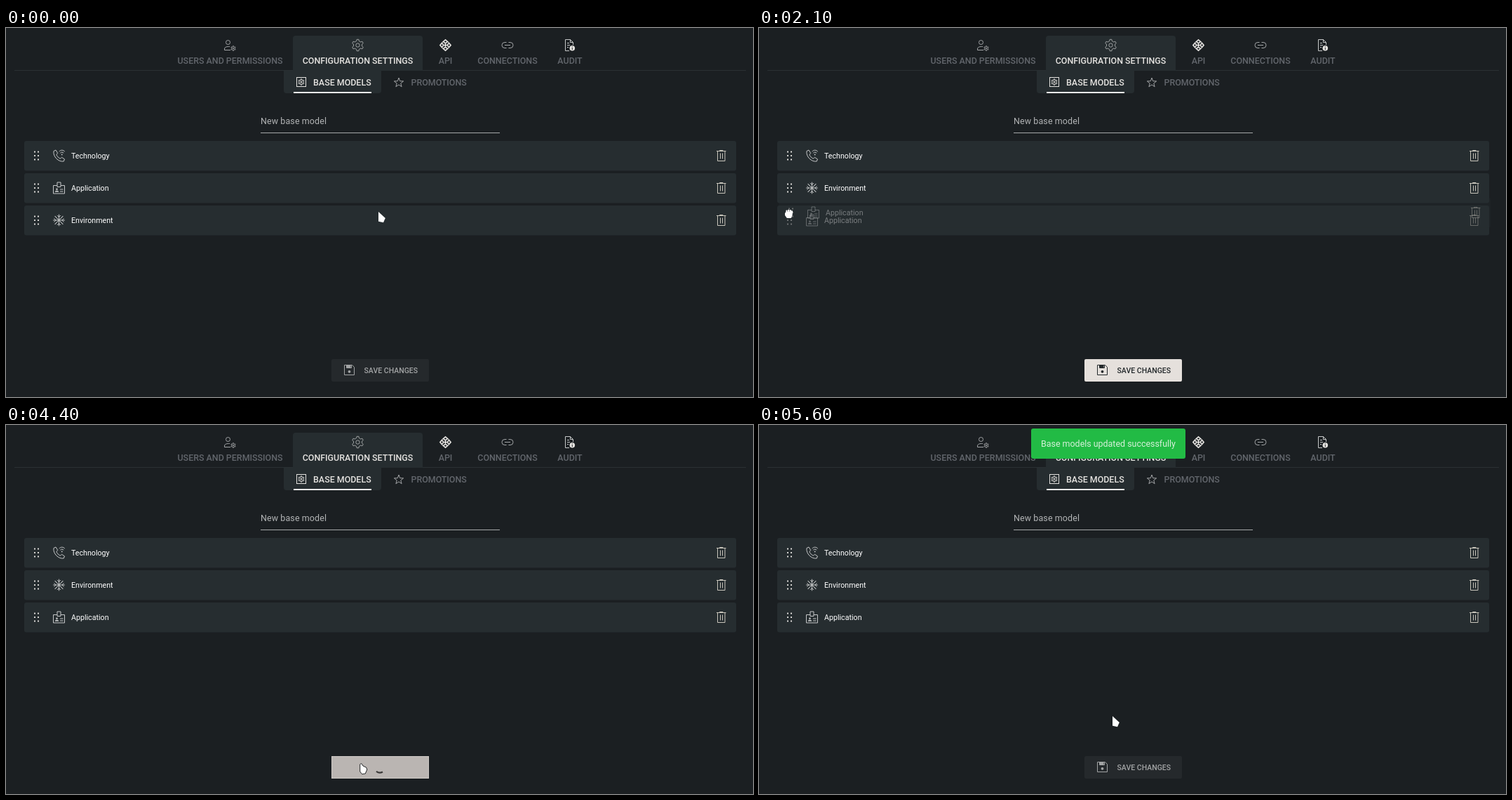
An HTML page with a canvas for the animation above (5900 ms loop, 1065 by 526 pixels).

```html
<!DOCTYPE html>
<html lang="en">
<head>
<meta charset="utf-8">
<title>Base models</title>
<style>
html, body { margin: 0; width: 100%; height: 100%; overflow: hidden; background: #1b1f22; }
canvas { display: block; width: 1065px; height: 526px; }
</style>
</head>
<body>
<canvas id="stage" width="1065" height="526"></canvas>
<script>
const ctx = document.getElementById('stage').getContext('2d');
const LOOP = 5900, STEP = 100;
const BG = '#1b1f22', PANEL = '#262d30', DIM = '#62666c', LIGHT = '#e4e2df', ICON = '#c6c8c9';
const TAU = Math.PI * 2;

// Pointer positions: time, x, y
const POINTER = [
  [700, 531, 262], [800, 515, 261], [900, 440, 255], [1000, 310, 245], [1100, 165, 233],
  [1200, 70, 224], [1300, 73, 228], [1400, 41, 229], [1500, 40, 228], [1800, 40, 228],
  [1900, 40, 236], [2000, 41, 250], [2100, 42, 263], [2200, 43, 274], [2300, 43, 278],
  [2400, 43, 278], [2500, 46, 283], [2600, 60, 304], [2800, 140, 362], [3000, 244, 392],
  [3100, 259, 394], [3400, 259, 394], [3500, 297, 412], [3700, 430, 459], [3900, 500, 481],
  [4000, 504, 482], [4400, 504, 482], [4600, 501, 465], [4900, 501, 465], [5100, 503, 425], [5200, 504, 415]
];
// Toast: time, top, opacity
const TOAST = [
  [4600, -43, 0], [4700, -35, .15], [4800, -23, .42], [4900, -10, .68], [5000, -5, .82],
  [5100, -1, .92], [5200, 2, .98], [5300, 5, 1], [5400, 8, 1], [5500, 6, 1], [5600, 5, 1]
];

function track(keys, t) {
  if (t <= keys[0][0]) return keys[0].slice(1);
  for (let i = 1; i < keys.length; i++) {
    const a = keys[i - 1], b = keys[i];
    if (t <= b[0]) {
      const k = (t - a[0]) / (b[0] - a[0]);
      return [a[1] + (b[1] - a[1]) * k, a[2] + (b[2] - a[2]) * k];
    }
  }
  return keys[keys.length - 1].slice(1);
}

function box(x, y, w, h, color, radius = 0) {
  ctx.fillStyle = color;
  ctx.beginPath();
  ctx.roundRect(x, y, w, h, radius);
  ctx.fill();
}

function text(str, x, y, size, color, weight = 400, align = 'left', spacing = 0) {
  ctx.font = `${weight} ${size}px Roboto, sans-serif`;
  ctx.letterSpacing = spacing + 'px';
  ctx.textAlign = align;
  ctx.fillStyle = color;
  ctx.fillText(str, x, y);
}

function line(d, color = ICON, width = 1) {
  ctx.strokeStyle = color;
  ctx.lineWidth = width;
  ctx.stroke(new Path2D(d));
}

function shape(d, color) {
  ctx.fillStyle = color;
  ctx.fill(new Path2D(d));
}

function circle(x, y, r, color, width = 0) {
  ctx.beginPath();
  ctx.arc(x, y, r, 0, TAU);
  if (width) {
    ctx.strokeStyle = color;
    ctx.lineWidth = width;
    ctx.stroke();
  } else {
    ctx.fillStyle = color;
    ctx.fill();
  }
}

function at(x, y, draw) {
  ctx.save();
  ctx.translate(x, y);
  draw();
  ctx.restore();
}

function gear(x, y, outer, inner, hole, color, teeth = 6, width = 1) {
  ctx.beginPath();
  for (let i = 0; i < teeth; i++) {
    const a = i / teeth * TAU - Math.PI / 2, u = TAU / teeth;
    [[-.28, inner], [-.16, outer], [.16, outer], [.28, inner]].forEach(([o, r]) =>
      ctx.lineTo(x + r * Math.cos(a + o * u), y + r * Math.sin(a + o * u)));
  }
  ctx.closePath();
  ctx.strokeStyle = color;
  ctx.lineWidth = width;
  ctx.stroke();
  circle(x, y, hole, color, width);
}

function star(x, y, outer, inner, color) {
  ctx.beginPath();
  for (let i = 0; i < 10; i++) {
    const a = i / 10 * TAU - Math.PI / 2, r = i % 2 ? inner : outer;
    ctx.lineTo(x + r * Math.cos(a), y + r * Math.sin(a));
  }
  ctx.closePath();
  ctx.strokeStyle = color;
  ctx.lineWidth = 1;
  ctx.stroke();
}

function header() {
  box(12, 60, 1043, 1, '#2a3033');
  box(409, 11, 185, 50, PANEL, [4, 4, 0, 0]);
  box(396, 61, 139, 32, PANEL, [0, 0, 4, 4]);
  box(410, 91, 111, 2, '#eeeeec');
  [['USERS AND PERMISSIONS', 319.5], ['CONFIGURATION SETTINGS', 501.5], ['API', 626.5],
   ['CONNECTIONS', 715], ['AUDIT', 804]].forEach(([s, x], i) =>
    text(s, x, 51, 12.44, i === 1 ? LIGHT : DIM, 500, 'center'));
  text('BASE MODELS', 438, 82, 12.44, LIGHT, 500);
  text('PROMOTIONS', 577.5, 82, 12.44, DIM, 500);

  circle(316.5, 20.5, 3, '#a2a4a6', 1);
  line('M320 31.5 H311.5 V30 C311.5 27 315 26.3 319 26.5', '#a2a4a6');
  gear(324, 29, 3.3, 2.4, .8, '#a2a4a6');
  gear(501.5, 24.5, 8.3, 6.2, 2.7, '#a2a5a5');

  at(626.5, 24.5, () => {
    for (let i = 0; i < 4; i++) {
      ctx.rotate(Math.PI / 2);
      line('M-4 -4.2 L0 -7.6 L4 -4.2 M-2.2 -4.4 L0 -2.6 L2.2 -4.4', LIGHT, 1.7);
    }
    shape('M0 -2.2 L2.2 0 L0 2.2 L-2.2 0 Z', LIGHT);
  });
  line('M713.5 20.5 H711 A4 4 0 0 0 711 28.5 H713.5 M716.5 20.5 H719 A4 4 0 0 1 719 28.5 H716.5 M711 24.5 H719', '#a2a4a6');
  line('M803 32.5 H797.5 V16.5 H804.5 L808.5 20.5 V24 M804.5 16.5 V20.5 H808.5 M800 21.5 H803 M800 24.5 H804 M800 27.5 H802', ICON);
  circle(807.3, 28.7, 3.8, LIGHT);
  box(806.8, 26.3, 1, 1, BG);
  box(806.8, 28.2, 1, 2.7, BG);

  ctx.strokeStyle = LIGHT;
  ctx.lineWidth = 1;
  ctx.strokeRect(414.5, 70.5, 13, 13);
  gear(421, 77, 4.2, 3, 1.1, LIGHT);
  star(560, 78, 7, 2.9, '#a2a4a6');

  text('New base model', 363, 136.7, 12.44, '#b2b4b5', 400, 'left', .117);
  box(363, 149, 341, 1, '#a6a8a9');
}

const icons = {
  Technology() {
    line('M-7.5 -6.5 L-4.5 -8 L-1.8 -3.5 L-3.6 -1.5 C-2.6 1.2 -.8 3 2 4.2 L4 2.4 L8 5 L6.8 8 C-.5 9.5 -8.8 1.2 -7.5 -6.5 Z');
    line('M.2 -5.8 C2.5 -8.5 6 -8.5 8.3 -5.8 M1.8 -3.7 C3.2 -5.3 5.3 -5.3 6.7 -3.7');
    circle(4.2, -1.6, .9, ICON);
  },
  Application() {
    line('M-2.5 -3.5 H-8 V8 H8 V-3.5 H2.5 M-2.5 -1.5 V-8 H2.5 V-1.5 Z M1.5 2 H6 M1.5 5 H6');
    circle(-3, 1.7, 1.3, ICON);
    shape('M-5.8 5.8 C-5.5 3.2 -.5 3.2 -.2 5.8 Z', ICON);
  },
  Environment() {
    ctx.save();
    for (let i = 0; i < 8; i++) {
      line('M0 0 V-8.3', ICON);
      if (i % 2 === 0) line('M-2.6 -7 L0 -4.4 L2.6 -7', ICON);
      ctx.rotate(Math.PI / 4);
    }
    ctx.restore();
  }
};

function handle(x, y, color = LIGHT) {
  for (let i = 0; i < 6; i++) box(x - 3.5 + i % 2 * 5, y - 6.5 + (i >> 1) * 5.5, 2, 2, color, .6);
}

function rowBody(name, x, y, alpha, grip = LIGHT) {
  ctx.save();
  ctx.globalAlpha = alpha;
  ctx.translate(x, y);
  handle(43.5, 0, grip);
  at(75.5, 0, icons[name]);
  text(name, 93, 4, 10.67, '#ffffff');
  line('M1013 -6.5 H1026.5 M1017.5 -6.5 V-7.5 H1022 V-6.5 M1014.5 -6.5 V7.5 H1025 V-6.5 M1018.5 -3.5 V4.5 M1021.5 -3.5 V4.5', '#c8c5bb');
  ctx.restore();
}

function rows(t, pos) {
  const names = t < 2100 ? ['Technology', 'Application', 'Environment'] : ['Technology', 'Environment', 'Application'];
  const held = t >= 1900 && t < 3300;
  const fade = Math.max(0, Math.min(1, (3300 - t) / 700));
  const ringing = t >= 2500 && t < 2800;
  const grip = ringing ? '#cf9468' : LIGHT;
  names.forEach((name, i) => {
    const y = 182 + 46 * i, lifted = held && name === 'Application';
    box(26, y - 21, 1015, 42.5, PANEL, 3);
    const gripped = t >= 1400 && t < 1800 && name === 'Application';
    rowBody(name, 0, y, lifted ? 1 - .42 * fade : 1, lifted ? grip : LIGHT);
    if (gripped) box(33, y - 5, 11, 12, PANEL);
  });
  if (!held) return;
  const [dx, dy] = t < 2500 ? [pos[0] - 40, pos[1]] : [3, 278];
  ctx.save();
  ctx.globalAlpha = .32 * fade;
  box(26 + dx, dy - 21, 1015, 42.5, PANEL, 3);
  ctx.restore();
  rowBody('Application', dx, dy, .38 * fade, grip);
}

function button(t) {
  const active = t >= 2100 && t < 4100, busy = t >= 4100 && t < 4600;
  box(464, 472, 139, 32, active ? '#e5e0dc' : busy ? '#bab5b2' : '#25292c', 2);
  if (busy) {
    ctx.strokeStyle = '#cfcac6';
    ctx.lineWidth = 1;
    ctx.strokeRect(464.5, 472.5, 138, 31);
    const a = (60 + (t - 4400) * .4) * Math.PI / 180;
    ctx.beginPath();
    ctx.arc(533, 487.5, 8, a, a + 1.2);
    ctx.strokeStyle = '#3a3938';
    ctx.lineWidth = 2.2;
    ctx.stroke();
    return;
  }
  const ink = active ? '#23282b' : '#a2a4a5';
  line('M482.5 480.5 H493.5 L496.5 483.5 V494.5 H482.5 Z M485.5 480.5 V484.5 H492.5 V480.5', ink);
  box(485.5, 481, 6, 3, ink);
  circle(489.5, 489.8, 1.9, ink);
  text('SAVE CHANGES', 510.5, 491.5, 10.5, ink, 500);
}

function ring(x, y, age) {
  if (age < 0 || age >= 300) return;
  ctx.save();
  ctx.globalAlpha = .9 - age / 400;
  circle(x, y, 5.5 + age * .04, '#cf8a58', 1.4);
  ctx.restore();
}

function openHand() {
  ctx.lineCap = 'round';
  line('M-2.3 0 L-3.2 -5.5 M.3 0 V-6.8 M2.8 0 L3.3 -6 M5 1 L6 -4 M-3 4 L-6 .8', '#ffffff', 2.1);
  shape('M-3.6 -1 L6 -1 L5.5 4 L3.8 8 H-2.2 L-5 3.5 Z', '#ffffff');
}

function closedHand() {
  ctx.lineCap = 'round';
  line('M-2.5 -1 V-2.5 M.2 -1 V-3.2 M2.8 -1 V-2.8 M5 0 V-1.6', '#ffffff', 2.2);
  shape('M-5 1 L-3.5 -1 L6 -1 L5.5 4 L3.8 8 H-2.2 L-5 4 Z', '#ffffff');
}

function pointer(t, [x, y]) {
  at(x, y, () => {
    if (t >= 1400 && t < 1800) openHand();
    else if (t >= 1800 && t < 2500) closedHand();
    else if (t >= 3800 && t < 4600) {
      const d = 'M.7 2 Q1.5 -.3 3.4 1.2 L5 4 L9.5 6 L10.8 9 L8.3 15 L3.5 15.6 L.7 12 Z';
      shape(d, '#ffffff');
      line(d, '#222426', 1);
    } else shape('M0 0 L9.8 9 L7 15.3 L0 13.7 Z', '#ffffff');
  });
}

function toast(t) {
  if (t < 4700) return;
  const [y, alpha] = track(TOAST, t);
  ctx.save();
  ctx.globalAlpha = alpha;
  box(388, y, 220, 43, '#22bb45', 3);
  text('Base models updated successfully', 402, y + 26, 12.44, '#d6f0da');
  ctx.restore();
}

function draw(t) {
  const pos = track(POINTER, t);
  box(0, 0, 1065, 526, BG);
  header();
  rows(t, pos);
  button(t);
  toast(t);
  ring(40, 228, t - 1800);
  ring(43, 278, t - 2500);
  ring(506, 483, t - 4100);
  pointer(t, pos);
}

const start = performance.now();
function tick() {
  const t = (performance.now() - start) % LOOP;
  draw(Math.floor(t / STEP) * STEP);
  requestAnimationFrame(tick);
}
tick();
</script>
</body>
</html>
```
